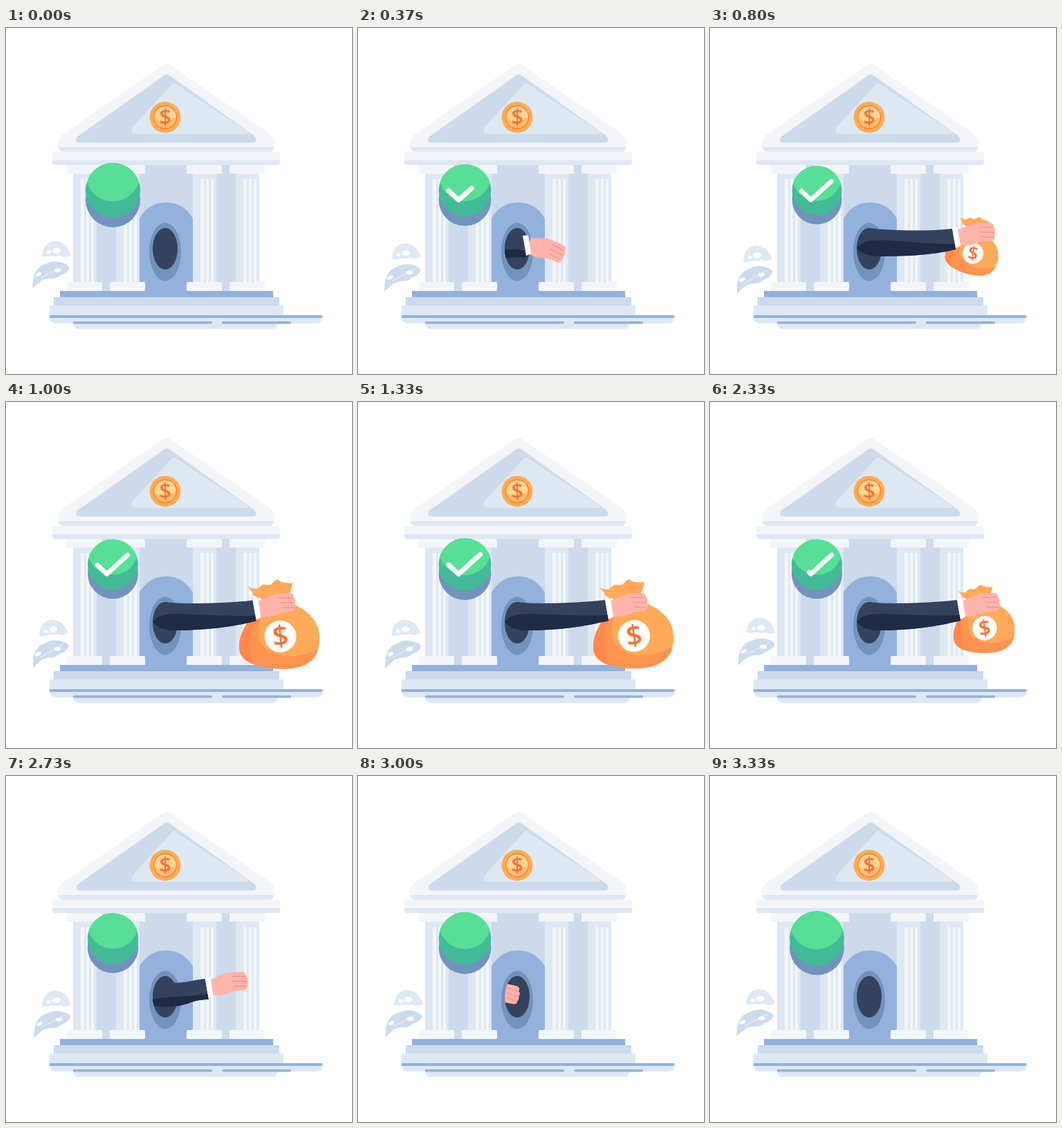
Recreate the animation shown at these times as an HTML page. Size 500 by 500 pixels, loop 3.36 s.

```html
<!DOCTYPE html>
<html lang="en">
<head>
<meta charset="utf-8">
<title>Bank payout</title>
<style>
html, body { margin: 0; width: 100%; height: 100%; overflow: hidden; background: #fff; }
svg { display: block; width: 100vw; height: 100vh; }
text { font-family: "Open Sans", "Noto Sans", sans-serif; font-weight: 600; text-anchor: middle; fill: #ff6f3c; }
.pale { fill: #f4f5f8; }
.mist { fill: #dde8f3; }
.sky { fill: #cddaec; }
.blue { fill: #94b0dc; }
.steel { fill: #7393bd; }
.navy { fill: #35425d; }
.ink { fill: #1f2b44; }
.gap { fill: #fff; }
</style>
</head>
<body>
<svg viewBox="0 0 500 500">
  <defs>
    <clipPath id="hole"><path d="M230 289A18 30 0 0 0 230 349V500H500V200H230Z"/></clipPath>
    <clipPath id="disc"><circle r="39.5" cy="-7"/></clipPath>
    <clipPath id="medal"><circle cx="230" cy="129" r="16.5"/></clipPath>
    <clipPath id="sack"><path d="M373 297C354 309 340 333 340 354C340 370 352 378 370 382C393 387 421 386 437 377C450 370 456 358 456 340C456 317 440 298 410 289Z"/></clipPath>
    <g id="column">
      <rect class="pale" width="34" height="170" y="210"/>
      <rect class="mist" width="11" height="158" y="210"/>
      <rect class="mist" x="16" width="3" height="158" y="210"/>
      <rect class="mist" x="23" width="3" height="158" y="210"/>
      <rect class="mist" x="30" width="4" height="158" y="210"/>
      <rect class="mist" width="34" height="8" y="210"/>
      <rect class="pale" x="-9" y="198" width="51" height="12.5" rx="1.5"/>
      <rect class="pale" x="-9" y="367" width="51" height="13.5" rx="2"/>
    </g>
  </defs>

  <!-- building -->
  <path class="pale" d="M226 54Q232 50 238 54L380 152Q388 158 388 167Q388 179 380 179H83Q75 179 75 167Q75 160 82 154Z"/>
  <path class="mist" d="M76 172H388Q386 179 380 179H83Q77 179 76 172Z"/>
  <path class="sky" d="M228 69Q232 65 237 69L359 156Q365 165 356 165.500H107Q98 165 103 157Z"/>
  <path class="mist" d="M239 82Q243 78 247 82L347 148Q353 153 346 153H189Q178 152 183 143Z"/>
  <rect class="pale" x="67" y="179" width="329" height="19" rx="4"/>
  <path class="mist" d="M67 191H396V194Q396 198 392 198H71Q67 198 67 194Z"/>
  <rect class="sky" x="97" y="198" width="269" height="182"/>
  <path class="blue" d="M192 380V276C202 260 214 252 231 252C249 252 261 260 270.500 276V380Z"/>
  <use href="#column" x="97"/>
  <use href="#column" x="159"/>
  <use href="#column" x="270"/>
  <use href="#column" x="332"/>
  <rect class="blue" x="78" y="380" width="308" height="9"/>
  <rect class="sky" x="69" y="389" width="326" height="12"/>
  <rect class="mist" x="63" y="401" width="338" height="15"/>
  <path class="mist" d="M63 416H458Q458 427 448 427H412L392 428Q392 435 385 435H106Q98 435 97 427H72Q63 427 63 416Z"/>
  <path class="blue" d="M63 415H456Q459 417 456 419H63Z"/>
  <rect class="blue" x="97" y="424" width="201" height="3.600" rx="1.500"/>
  <rect class="blue" x="312" y="424" width="100" height="3.600" rx="1.500"/>

  <!-- emblem -->
  <circle cx="230" cy="129" r="22.500" fill="#ffab55"/>
  <g clip-path="url(#medal)">
    <circle cx="230" cy="129" r="17" fill="#ffd793"/>
    <path d="M210 129Q230 142 250 126V150H210Z" fill="#ffbd6e"/>
  </g>
  <circle cx="230" cy="129" r="16.500" fill="none" stroke="#ff7a3d" stroke-width="1.300"/>
  <text x="230" y="139" font-size="31">$</text>

  <ellipse class="steel" cx="230" cy="323.500" rx="23" ry="42"/>
  <ellipse class="navy" cx="230" cy="319" rx="18" ry="30"/>

  <!-- leaves -->
  <g id="leafA">
    <path class="mist" d="M52 330Q54 309 71 308Q88 309 94 329Q84 333 79 329Q72 331 66 329Q58 331 52 330Z"/>
    <ellipse class="gap" cx="73" cy="322" rx="6" ry="4"/>
    <ellipse class="gap" cx="62" cy="324" rx="3" ry="2.500"/>
  </g>
  <g id="leafB">
    <path class="sky" d="M38 376L39.500 362Q43 346 55 342Q70 335 80 339Q89 341 92 347Q88 355 79 357Q72 363 64 362Q56 362 50 366Z"/>
    <path d="M50 361L84 344" stroke="#dde8f3" stroke-width="2"/>
    <ellipse class="gap" cx="47" cy="356" rx="4.500" ry="2.600" transform="rotate(-25 47 356)"/>
    <ellipse class="gap" cx="75" cy="350" rx="5" ry="3"/>
  </g>

  <!-- check badge -->
  <g id="badge">
    <circle class="steel" cy="7" r="39.500"/>
    <circle cy="-7" r="39.500" fill="#43bb98"/>
    <circle cy="-30.500" r="39.500" fill="#58de97" clip-path="url(#disc)"/>
    <path id="tick" d="M-24.500 -6.500L-9.500 7.500L23 -22" fill="none" stroke="#fff" stroke-width="7.300" stroke-linecap="round" stroke-linejoin="round" pathLength="100"/>
  </g>

  <!-- arm -->
  <g clip-path="url(#hole)">
    <g id="bag">
      <path d="M349 268Q357 272 364 270Q369 263 374 264Q381 266 385 261Q388 257 392 256Q397 262 414 260Q412 274 404 284L400 300H382L368 284Q355 281 356 276Q353 273 349 268Z" fill="#ffa95a"/>
      <g clip-path="url(#sack)">
        <rect x="335" y="285" width="125" height="105" fill="#ffa95a"/>
        <path d="M335 290H378C366 314 361 340 376 354C396 372 430 369 460 351V392H335Z" fill="#ff934f"/>
        <path d="M335 290H374C356 318 350 350 364 384H335Z" fill="#ff884f"/>
      </g>
      <circle cx="399" cy="338" r="23" fill="#fff"/>
      <text x="399" y="352" font-size="41" transform="rotate(-8 399 338)">$</text>
    </g>
    <path id="sleeve" class="navy"/>
    <path id="shade" class="ink"/>
    <g id="hand">
      <path d="M-2 -11C9 -13 15 -21 27 -21L45 -22Q51 -21 50 -15.500Q54 -13 52 -9Q54 -5 52 -1.500Q53 3 48 4L32 6C26 8 20 12 12 12L0 12Z" fill="#ffb3ab"/>
      <path d="M29 -15.500H49M31 -8.500H51M33 -1.500H51" fill="none" stroke="#f18f8d" stroke-width="1.200" stroke-linecap="round"/>
    </g>
    <path id="cuff" d="M-9 -13L-1 -13.500L3 13L-4 16Z" fill="#fff"/>
  </g>
</svg>
<script>
const LOOP = 3360, STEP = 100 / 3;
const el = {};
document.querySelectorAll("g[id], path[id]").forEach(e => el[e.id] = e);

const clamp = v => Math.max(0, Math.min(1, v));
const ramp = (t, a, b) => clamp((t - a) / (b - a));
const ease = p => p * p * (3 - 2 * p);

// smooth curve through [time, value] keys without overshoot
function curve(keys, t) {
  const last = keys.length - 1;
  if (t <= keys[0][0]) return keys[0][1];
  if (t >= keys[last][0]) return keys[last][1];
  const rate = i => (keys[i + 1][1] - keys[i][1]) / (keys[i + 1][0] - keys[i][0]);
  const slope = i => {
    if (i === 0 || i === last) return 0;
    const a = rate(i - 1), b = rate(i);
    return a * b <= 0 ? 0 : 2 * a * b / (a + b);
  };
  let i = 0;
  while (t >= keys[i + 1][0]) i++;
  const [t0, a] = keys[i], [t1, b] = keys[i + 1];
  const d = t1 - t0, p = (t - t0) / d, s = ease(p), q = 1 - p;
  return a + (b - a) * s + d * p * q * (q * slope(i) - p * slope(i + 1));
}

const wristX = [[40, 150], [370, 248], [530, 290], [800, 359], [1070, 366], [2480, 366], [2670, 323], [2730, 298], [3150, 150]];
const wristY = [[370, 313], [530, 307], [800, 302], [1070, 298], [2480, 298], [2730, 305], [3000, 312]];
const handTurn = [[200, 34], [370, 27], [530, 14], [800, 2], [1070, 0], [2730, 0], [3100, 20]];

const beats = [0, 370, 800, 1330, 2330, 2730, LOOP];
const sway = values => beats.map((b, i) => [b, values[i]]);
const leafA = [[0, -3, -4, -3.5, 0.5, 0, 0], [0, 2, 4.5, 5, 4.5, 1.5, 0], [0, -3, -5, -4, 2, -2, 0]].map(sway);
const leafB = [[0, -1, -1, -0.5, 2, 1.5, 0], [0, 3, 5.5, 6, 3.5, 1.5, 0], [0, -2, -3, -3, -1, -1, 0]].map(sway);

const set = (e, name, value) => e.setAttribute(name, value);

function moveLeaf(e, keys, t, pivot) {
  const [x, y, r] = keys.map(k => curve(k, t));
  set(e, "transform", `translate(${x} ${y}) rotate(${r} ${pivot})`);
}

function drawBadge(t) {
  const p = t % (LOOP / 2) / (LOOP / 2);
  const scale = 1 - 0.094 * (1 - Math.abs(2 * p - 1));
  set(el.badge, "transform", `translate(154.5 241.500) scale(${scale})`);
  const from = 100 * ease(ramp(t, 2200, 2600));
  const shown = 100 * ramp(t, 170, 440) - from;
  set(el.tick, "visibility", shown > 0.5 ? "visible" : "hidden");
  set(el.tick, "stroke-dasharray", `${Math.max(shown, 0.01)} 300`);
  set(el.tick, "stroke-dashoffset", -from);
}

function drawArm(t) {
  const x = curve(wristX, t), y = curve(wristY, t);
  const reach = clamp((x - 300) / 58);
  const x0 = Math.min(212, x - 70);
  const top = 297 - 8 * reach, low = 333 - 3 * reach;
  const under = `L${x - 4} ${y + 18}C${x - 30} ${y + 18 + 6 * reach} ${x0 + 50 + 40 * reach} ${low} ${x0 + 28} ${low}Q${x0 + 8} ${low - 2 * reach} ${x0} ${low - 12 * reach}Z`;
  set(el.sleeve, "d", `M${x0} 312Q${x0 + 2} ${top + 2} ${x0 + 18} ${top}C${x0 + 45} ${top + 4} ${x - 40} ${y - 8} ${x - 9} ${y - 12}${under}`);
  set(el.shade, "d", `M${x0} ${322 - 4 * reach}C${x0 + 16} ${320 - 24 * reach} ${x0 + 60} ${318 - 6 * reach} ${x - 5} ${y + 10}${under}`);
  set(el.cuff, "transform", `translate(${x} ${y})`);
  set(el.hand, "transform", `translate(${x} ${y}) rotate(${curve(handTurn, t)})`);

  const size = ramp(t, 480, 970) * (1 - ease(ramp(t, 2170, 2690)));
  const tilt = 16 * (1 - ease(ramp(t, 780, 1070)));
  set(el.bag, "visibility", size > 0.01 ? "visible" : "hidden");
  set(el.bag, "transform", `translate(${x + 24} ${y - 8}) rotate(${tilt}) scale(${size}) translate(-390 -290)`);
}

function draw(t) {
  moveLeaf(el.leafA, leafA, t, "94 330");
  moveLeaf(el.leafB, leafB, t, "92 348");
  drawBadge(t);
  drawArm(t);
}

const start = performance.now();
function tick() {
  const t = (performance.now() - start) % LOOP;
  draw(Math.floor((t + 3.4) / STEP) * STEP);
  requestAnimationFrame(tick);
}
tick();
</script>
</body>
</html>
```
